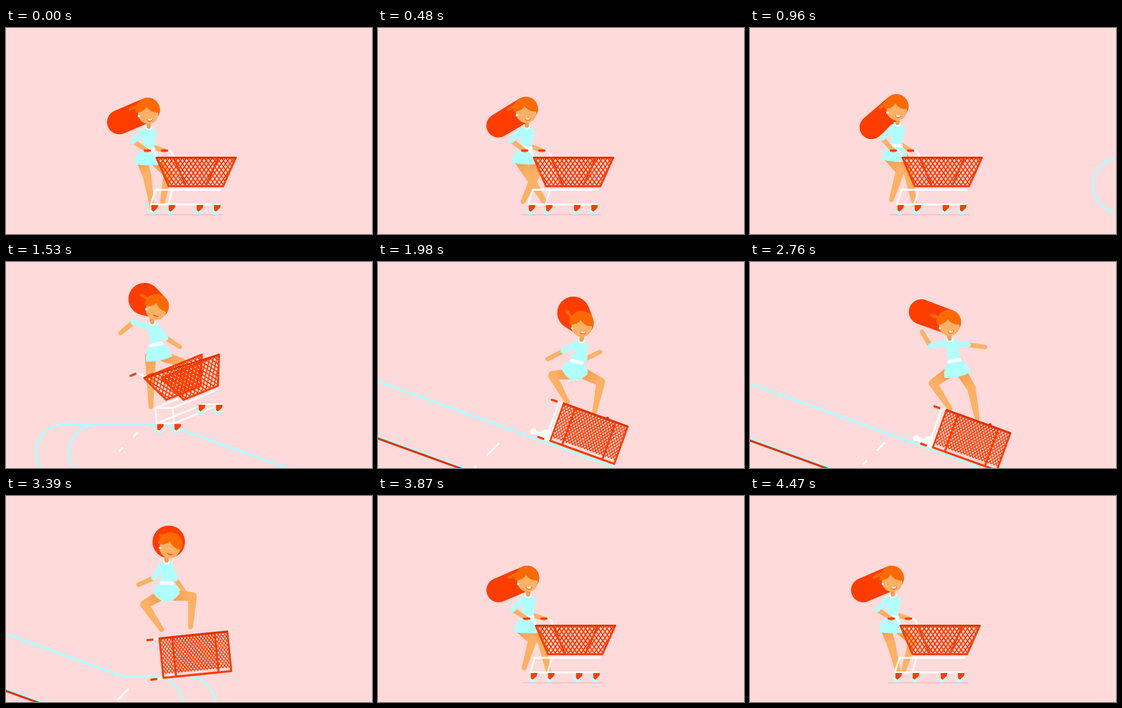
Animation, 720 px wide and 405 px high, one loop 4.5 s. Source, as an HTML page with a canvas:

```html
<!DOCTYPE html>
<html lang="en">
<head>
<meta charset="utf-8">
<title>Trolley ride</title>
<style>
html, body { margin: 0; width: 100%; height: 100%; overflow: hidden; background: #ffdada; }
canvas { display: block; width: 720px; height: 405px; }
</style>
</head>
<body>
<canvas id="stage" width="720" height="405"></canvas>
<script>
const ctx = document.getElementById('stage').getContext('2d');
const LOOP = 4500, HOME = 3780, STEP = 780, SPEED = 1.08, SLOPE = 0.362;
const BG = '#ffdada', RED = '#ff3d00', DARK = '#e03400', ORANGE = '#ff6a00';
const SKIN = '#fdb164', SHADE = '#f99d50', CYAN = '#b0ffff', WHITE = '#fff';
const { PI, sin, cos, min, max, hypot } = Math;

const clamp = v => max(0, min(1, v));
const mix = (a, b, k) => a + (b - a) * k;
const mixPoint = (p, q, k) => [mix(p[0], q[0], k), mix(p[1], q[1], k)];
const add = (p, q) => [p[0] + q[0], p[1] + q[1]];
const turned = ([x, y], a) => [x * cos(a) - y * sin(a), x * sin(a) + y * cos(a)];
const ease = (t, from, to) => {
  const s = clamp((t - from) / (to - from));
  return s * s * (3 - 2 * s);
};
const bump = (t, from, to, height) => height * sin(PI * clamp((t - from) / (to - from)));
const random = n => (sin(n * 127.1) * 43758.5 % 1 + 1) % 1;

// Monotone cubic through keys of the form [time, ...values]
function track(keys) {
  const last = keys.length - 1;
  const rate = (i, c) => (keys[i + 1][c] - keys[i][c]) / (keys[i + 1][0] - keys[i][0]);
  const tangent = (i, c) => {
    if (i === 0 || i === last) return 0;
    const a = rate(i - 1, c), b = rate(i, c);
    return a * b <= 0 ? 0 : 2 * a * b / (a + b);
  };
  return t => {
    const next = keys.findIndex(k => k[0] > t);
    if (next < 1) return keys[next ? last : 0].slice(1);
    const i = next - 1, h = keys[next][0] - keys[i][0], s = (t - keys[i][0]) / h;
    return keys[i].slice(1).map((p, n) => mix(p, keys[next][n + 1], s * s * (3 - 2 * s))
      + h * s * (1 - s) * ((1 - s) * tangent(i, n + 1) - s * tangent(next, n + 1)));
  };
}
const homing = keys => track([...keys, [HOME, ...keys[0].slice(1)]]);

const railTop = track([[1050, 255], [1530, 320], [3390, 356], [3700, 256]]);
const slopeLevel = track([[1530, 313.5], [1980, 343.6], [2760, 347.6], [3390, 379.6]]);

// Basket corner x, y, tilt, roll onto its side
const cartPose = homing([
  [0, 296, 255, 0, 0],
  [960, 300, 255, 0, 0],
  [1260, 284, 238, -0.28, 0],
  [1530, 272, 228, -0.385, 0],
  [1980, 365, 278, 0.346, 1],
  [2760, 386, 291, 0.346, 1],
  [3390, 302, 280, -0.1, 1]
]);
// Waist x, y, lean, crouch, head turn, hair tail dx, dy
const riderPose = homing([
  [0, 280, 238, 0.02, 0, 0, -56, 24],
  [960, 287, 231, 0.07, 0, 0, -49, 41],
  [1530, 296, 162, -0.19, 0.1, 0.3, -24, -14],
  [1980, 391, 196, 0.21, 1, 0.08, -16, -20],
  [2760, 402, 194, -0.21, 0.1, 0, -54, -20],
  [3390, 316, 172, 0, 1, 0.27, -3, -5]
]);
// Free hands, measured from the neck
const handPose = track([
  [1530, -63, 19, 54, 46],
  [1980, -66, 36, 37, 22],
  [2760, -55, -16, 69, 14],
  [3390, -55, 45, 36, 61]
]);
// Height of the feet in the cart
const footLevel = track([[1530, 57], [1980, -5], [2760, -5], [3390, -16], [HOME, 91]]);

function dot(x, y, r, fill) {
  ctx.fillStyle = fill;
  ctx.beginPath();
  ctx.arc(x, y, r, 0, 7);
  ctx.fill();
}
function line(points, color, width, closed) {
  ctx.strokeStyle = color;
  ctx.lineWidth = width;
  ctx.beginPath();
  points.forEach(p => ctx.lineTo(...p));
  if (closed) ctx.closePath();
  ctx.stroke();
}
// Hull of two circles
function limb([x1, y1], r1, [x2, y2], r2, fill) {
  const a = Math.atan2(y2 - y1, x2 - x1), d = hypot(x2 - x1, y2 - y1) || 1;
  const b = Math.acos(max(-1, min(1, (r1 - r2) / d)));
  ctx.fillStyle = fill;
  ctx.beginPath();
  ctx.arc(x1, y1, r1, a + b, a - b + 2 * PI);
  ctx.arc(x2, y2, r2, a - b, a + b);
  ctx.fill();
}
// Middle joint of a two-bone chain
function joint([ax, ay], [bx, by], l1, l2, bend) {
  const len = hypot(bx - ax, by - ay) || 1, d = min(len, l1 + l2);
  const ux = (bx - ax) / len, uy = (by - ay) / len;
  const along = (l1 * l1 - l2 * l2 + d * d) / (2 * d);
  const out = bend * Math.sqrt(max(0, l1 * l1 - along * along));
  return [ax + ux * along - uy * out, ay + uy * along + ux * out];
}

function railGeometry(t) {
  const x1 = 318 - SPEED * (t - 1530), x2 = 235 - SPEED * (t - 3390);
  const rise = SLOPE * (x2 - x1);
  let y1 = slopeLevel(t)[0] + SLOPE * (x1 - 300);
  if (t < 1530) y1 = railTop(t)[0];
  if (t > 3390) y1 = railTop(t)[0] - rise;
  return { x1, y1, x2, y2: y1 + rise };
}

function drawRails({ x1, y1, x2, y2 }) {
  ctx.strokeStyle = CYAN;
  ctx.lineWidth = 4.2;
  for (const d of [0, 65]) {
    ctx.beginPath();
    ctx.arc(x1 - 203 + d, y1 + 54.5, 54.5, PI / 2, PI * 1.5);
    ctx.lineTo(x1, y1);
    ctx.lineTo(x2, y2);
    ctx.arc(x2 + 59 + d, y2 + 54.5, 54.5, -PI / 2, PI / 2);
    ctx.lineTo(x2, y2 + 109);
    ctx.lineTo(x1, y1 + 109);
    ctx.closePath();
    ctx.stroke();
  }
  line([[x1, y1 + 112], [x2, y2 + 112]], DARK, 4.2);
}

// Broken streaks sliding down a diagonal below the rail
function drawStreaks(t, { x1, y1, x2, y2 }) {
  if (t < 1350 || t > 3600) return;
  const cycle = Math.floor(t / 300), p = t / 300 % 1;
  const x = 282 - 40 * random(cycle) - 40 * p;
  const y = min(max(y1, y1 + SLOPE * (x - x1)), y2) + 12 + 40 * p;
  const len = 24 * sin(PI * p);
  for (const [from, to] of [[0, len], [len + 22, len + 28]]) {
    line([[x - from, y + from], [x - to, y + to]], WHITE, 3.5);
  }
}

function readCart(t) {
  const [x, y, tilt, roll] = cartPose(t);
  const at = (px, py) => add([x, y], turned([px, py], tilt));
  const depth = mix(34, 25, roll), side = turned([depth, 0], tilt * roll);
  const near = [at(0, 0), at(mix(122, 109, roll), 0), at(mix(97, 109, roll), mix(56, 78, roll)), at(mix(24, 0, roll), mix(56, 78, roll))];
  const far = near.map(p => add(p, side));
  const bases = [near[0], mixPoint(far[0], near[3], roll)];
  const reach = turned([mix(-23, -24, roll), mix(-14, 1, roll)], tilt);
  const grips = bases.map(p => add(p, reach));
  return { x, y, tilt, roll, at, depth, side, near, far, bases, grips, sliding: clamp(2 * roll - 1) * clamp(tilt * 5) };
}

function drawWheel([x, y]) {
  dot(x, y, 8, CYAN);
  dot(x, y, 4, WHITE);
  ctx.fillStyle = RED;
  ctx.beginPath();
  [[-2, -10], [9, -10], [8, -6], [1, 1], [-2, -1]].forEach(([dx, dy]) => ctx.lineTo(x + dx, y + dy));
  ctx.closePath();
  ctx.fill();
  ctx.strokeStyle = RED;
  ctx.lineWidth = 2;
  ctx.stroke();
}

function drawChassis({ at, side, roll }) {
  ctx.globalAlpha = clamp(1 - 2 * roll);
  const near = [at(-2, 63), at(92, 63), at(89, 92), at(-11, 92)];
  const far = near.map(p => add(p, side));
  for (const [a, b, c, d] of [far, near]) line([b, a, d, c], WHITE, 3.3);
  near.forEach((p, i) => line([p, far[i]], WHITE, 3.3));
  for (const frame of [near, far]) {
    drawWheel(add(frame[3], [4, 12]));
    drawWheel(add(frame[2], [-7, 12]));
  }
  ctx.globalAlpha = 1;
}

function drawPanel(quad, tilt, pitch) {
  ctx.save();
  ctx.beginPath();
  quad.forEach(p => ctx.lineTo(...p));
  ctx.clip();
  ctx.translate(...quad[0]);
  ctx.rotate(tilt);
  for (let i = -16; i < 36; i++) {
    for (const d of [-8, 8]) {
      line([[(i - d) * pitch, -11.2 * pitch], [(i + d) * pitch, 11.2 * pitch]], RED, pitch * 0.27);
    }
  }
  ctx.restore();
  line(quad, RED, 4, true);
}

function drawCart(cart) {
  const { at, near, far, tilt, depth, bases, grips, sliding } = cart;
  drawChassis(cart);
  grips.forEach((grip, i) => {
    const end = add(grip, turned([10, 0], tilt));
    const bend = add(grip, turned([20, 0], tilt));
    ctx.strokeStyle = WHITE;
    ctx.lineWidth = 4;
    ctx.beginPath();
    ctx.moveTo(...end);
    ctx.quadraticCurveTo(...bend, ...bases[i]);
    ctx.stroke();
    line([grip, end], RED, 4.5);
  });
  for (const quad of [far, near]) drawPanel(quad, tilt, depth / 4);
  line([near[0], far[1]], DARK, 3.6);
  ctx.globalAlpha = sliding;
  line([at(-9, 0), at(-9, 72)], WHITE, 3.5);
  line([at(-3, 0), at(-3, 76)], WHITE, 3);
  dot(...at(91, -2), 3, DARK);
  ctx.globalAlpha = 1;
}

function drawPuff(t, { at, sliding }) {
  ctx.globalAlpha = sliding;
  for (let i = 0; i < 4; i++) {
    const r = 9 - 1.6 * i + 2 * sin(t / 60 + i * 2);
    dot(...at(-10 - 9 * i, 75 - r / 2), r, WHITE);
  }
  ctx.globalAlpha = 1;
}

function drawLeg(hip, foot, bend) {
  const knee = joint(hip, foot, 36, 60, bend);
  const skin = ctx.createLinearGradient(...hip, ...knee);
  skin.addColorStop(0, SHADE);
  skin.addColorStop(1, SKIN);
  limb(hip, 10.5, knee, 8.5, skin);
  limb(knee, 8.5, foot, 4.7, SKIN);
}

function drawArm(shoulder, hand, bend) {
  const elbow = joint(shoulder, hand, 30, 33, bend);
  limb(elbow, 4.8, hand, 4.3, SKIN);
  limb(shoulder, 5.8, elbow, 5.2, CYAN);
}

function drawDress(waist, lean, crouch) {
  const hem = 30 - 10 * crouch, bust = 16 - 5 * crouch;
  ctx.save();
  ctx.translate(...waist);
  ctx.rotate(lean);
  ctx.fillStyle = CYAN;
  ctx.beginPath();
  ctx.moveTo(-12, -38);
  ctx.lineTo(-6, -44);
  ctx.lineTo(7, -44);
  ctx.quadraticCurveTo(bust - 2, -37, bust, -30);
  ctx.quadraticCurveTo(11, -20, 12, 0);
  ctx.quadraticCurveTo(25, hem / 2 - 3, 26, hem);
  ctx.quadraticCurveTo(0, hem + 4 + 30 * crouch, -26, hem);
  ctx.quadraticCurveTo(-25, hem / 2 - 4, -12, 0);
  ctx.quadraticCurveTo(-9, -20, -12, -38);
  ctx.fill();
  line([[-10, 0], [10, 0]], WHITE, 7);
  ctx.strokeStyle = WHITE;
  ctx.lineWidth = 3.5;
  ctx.beginPath();
  ctx.arc(0, -45, 6, 0.1, 3.04);
  ctx.stroke();
  line([[0, -51], [0, -44]], SHADE, 8);
  ctx.restore();
}

function drawHead(head, turn, tail) {
  const root = add(head, turned([-19, -8], turn)), reach = hypot(...tail);
  line([root, add(root, tail.map(v => v * 17 / max(17, reach)))], ORANGE, 6);
  const smile = clamp(1 - turn / 0.27);
  ctx.save();
  ctx.translate(...head);
  ctx.rotate(turn);
  dot(1, 7, 20.3, SKIN);
  ctx.fillStyle = ORANGE;
  ctx.beginPath();
  ctx.arc(0, 0, 24, PI - 0.2, 0.2);
  ctx.quadraticCurveTo(6, 7, -2, -6);
  ctx.quadraticCurveTo(-9, 6, -23.5, 4.8);
  ctx.fill();
  dot(-17.5, 12, 2.4, WHITE);
  ctx.translate(4, 17.5);
  for (const [fill, rx, ry] of [['#ef6a28', 6, 3 + 2.5 * smile], [WHITE, 4.5, 3.6 * smile]]) {
    ctx.fillStyle = fill;
    ctx.beginPath();
    ctx.ellipse(0, 0, rx, ry, 0, 0, PI);
    ctx.fill();
  }
  ctx.restore();
}

function drawRider(t, cart) {
  const [x, y, lean, crouch, turn, ...tail] = riderPose(t);
  const rise = bump(t, 1200, 1530, 8) + bump(t, 2000, 2740, 8) + bump(t, 2780, 3380, 36) + bump(t, 3390, 3740, 75);
  const waist = [x, y - rise], neck = add(waist, turned([0, -42], lean));
  const head = add(neck, turned([0, -35], turn - 0.06));
  const ride = ease(t, 1180, 1500) - ease(t, 3480, 3740);

  const clock = t < LOOP / 2 ? t : t - LOOP;
  const legs = [-1, 1].map(side => {
    const phase = 0.45 + 2 * PI * clock / STEP + (side > 0 ? PI : 0);
    const ground = [cart.x + 1 - 24 * sin(phase), 346 - 9 * max(0, cos(phase - 2.2))];
    const aboard = cart.at(side < 0 ? mix(-9, 6, cart.roll) : 63, footLevel(t)[0]);
    aboard[1] -= rise * clamp((t - 2780) / 100) * 0.6;
    const stride = -0.5 - 0.5 * cos(phase - 2.8);
    return {
      hip: add(waist, [side < 0 ? -12 : 15, 24]),
      foot: mixPoint(ground, aboard, ride),
      bend: mix(stride, -side, side < 0 ? cart.roll : ride)
    };
  });

  const free = handPose(t);
  const arms = [0, 1].map(i => ({
    shoulder: add(neck, [i ? 6 : -9, 6]),
    hand: mixPoint(add(cart.grips[i], [5, 0]), add(neck, free.slice(2 * i, 2 * i + 2)), ride),
    bend: i ? 1 : 1 - 2 * cart.roll
  }));

  limb(add(head, tail), min(32, 38 - 0.23 * hypot(...tail)), head, 24, RED);
  drawArm(arms[1].shoulder, arms[1].hand, arms[1].bend);
  for (const { hip, foot, bend } of legs.reverse()) drawLeg(hip, foot, bend);
  drawDress(waist, lean, crouch);
  drawArm(arms[0].shoulder, arms[0].hand, arms[0].bend);
  drawHead(head, turn, tail);
}

function draw(t) {
  ctx.fillStyle = BG;
  ctx.fillRect(0, 0, 720, 405);
  ctx.lineCap = ctx.lineJoin = 'round';
  const rails = railGeometry(t), cart = readCart(t);
  drawStreaks(t, rails);
  drawPuff(t, cart);
  drawRails(rails);
  ctx.save();
  ctx.translate(bump(t, 0, 800, 9) + bump(t, 3600, 4350, 16), 0);
  ctx.globalAlpha = 1 - ease(t, 1080, 1200) + ease(t, 3660, 3760);
  line([[cart.x - 24, 367], [cart.x + 131, 367]], '#ffc0c9', 2.6);
  ctx.globalAlpha = 1;
  drawRider(t, cart);
  drawCart(cart);
  ctx.restore();
}

const start = performance.now();
function tick() {
  draw((performance.now() - start) % LOOP);
  requestAnimationFrame(tick);
}
tick();
</script>
</body>
</html>
```
